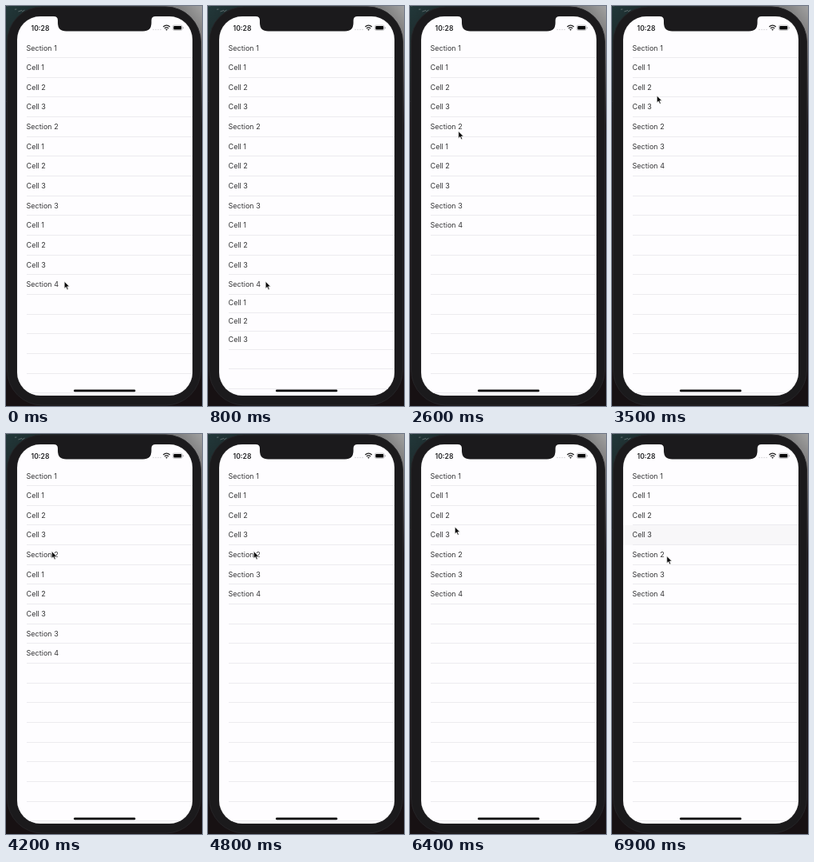
An HTML page that plays this animation: 246 px wide and 500 px high, repeating every 7 s.

```html
<!DOCTYPE html>
<html lang="en">
<head>
<meta charset="utf-8">
<title>Expandable list</title>
<style>
  html, body { margin: 0; width: 100%; height: 100%; overflow: hidden; background: #151214; }
  #stage { position: relative; width: 246px; height: 500px; overflow: hidden; }
  svg { position: absolute; left: 0; top: 0; }
  #screen {
    position: absolute; left: 14px; top: 13px; width: 219.5px; height: 474px;
    border-radius: 29px; background: #fefdff; overflow: hidden;
    box-shadow: 0 0 1px #fff6;
  }
  #list {
    --row: 24.67px;
    position: absolute; left: 0; right: 0; top: 27.5px;
    font: 400 9px Inter, "Liberation Sans", sans-serif; color: #343436;
  }
  .slot { position: relative; height: var(--row); overflow: hidden; }
  .row {
    position: absolute; left: 0; right: 0; bottom: 0; height: var(--row);
    line-height: var(--row); padding-left: 11.6px; white-space: pre;
  }
  .row::after {
    content: ""; position: absolute; left: 12px; right: 0; bottom: 0;
    height: 1px; background: #ecebef;
  }
  .clock { font: 600 8.6px Inter, "Liberation Sans", sans-serif; fill: #222224; }
</style>
</head>
<body>
<div id="stage">
  <svg width="246" height="500" viewBox="0 0 246 500">
    <defs>
      <linearGradient id="sky">
        <stop offset="0" stop-color="#22383a"/>
        <stop offset=".3" stop-color="#1a2324"/>
        <stop offset=".7" stop-color="#48494a"/>
        <stop offset="1" stop-color="#a2a2a2"/>
      </linearGradient>
      <linearGradient id="dusk" x2="0" y2="1">
        <stop offset="0" stop-color="#171113" stop-opacity="0"/>
        <stop offset=".3" stop-color="#171113"/>
      </linearGradient>
    </defs>
    <rect width="246" height="500" fill="url(#sky)"/>
    <path id="foam" fill="none" stroke="#8b9696" stroke-opacity=".6"/>
    <rect width="246" height="500" fill="url(#dusk)"/>
    <rect x="1.500" y="1" width="243" height="498" rx="44" fill="#1b1a1c" stroke="#252427"/>
  </svg>

  <div id="screen"><div id="list"></div></div>

  <svg width="246" height="500" viewBox="0 0 246 500">
    <path fill="#1b1a1c" d="M60 12V13Q65 13 65 18V21Q65 31.5 75.5 31.5H172Q182.500 31.5 182.500 21V18Q182.500 13 187.500 13V12Z"/>
    <text class="clock" x="31.500" y="30.500">10:28</text>
    <path d="M185 29.500H195" stroke="#cfcfd2" stroke-width="1.500" stroke-linecap="round" stroke-dasharray="0 3"/>
    <g fill="none" stroke="#222" stroke-width="1.300">
      <path d="M197.300 26Q201.500 22.200 205.700 26"/>
      <path d="M199 28Q201.500 25.700 204 28"/>
    </g>
    <path fill="#222" d="M201.500 30.800L200.100 29.300Q201.500 28.200 202.900 29.300Z"/>
    <rect x="209.300" y="24" width="12" height="6.400" rx="1.800" fill="none" stroke="#b0b0b3" stroke-width=".7"/>
    <rect x="210.300" y="25" width="10" height="4.400" rx="1" fill="#0a0a0a"/>
    <rect x="222" y="26.200" width="1" height="2" rx=".5" fill="#b0b0b3"/>
    <rect x="85" y="479.500" width="77.500" height="2.800" rx="1.400" fill="#050505"/>
    <path id="cursor" d="M0 0V9.400L2.200 7.400L3.700 10.900L5.300 10.200L3.800 6.800H6.800Z"
          fill="#0b0b0b" stroke="#fff" stroke-width=".7" stroke-linejoin="round"/>
  </svg>
</div>

<script>
const LOOP = 7000, STEP = 100, SLIDE = 300, ROW = 24.67;

// Per section: starts open?, then the times at which it toggles
const sections = [
  { open: 1, taps: [5450, 5850] },
  { open: 1, taps: [2750, 3850, 4450] },
  { open: 1, taps: [1750] },
  { open: 0, taps: [350, 750] }
];

// Pointer glides from rest to rest
const home = { x: 73.2, y: 344.3 };
const glides = [
  { at: 0, end: 100, x: 72.2, y: 344.3 },
  { at: 1100, end: 1400, x: 94, y: 225 },
  { at: 1400, end: 1600, x: 78.8, y: 243.8 },
  { at: 2100, end: 2600, x: 60.8, y: 156.5 },
  { at: 3100, end: 3500, x: 56.3, y: 112 },
  { at: 3500, end: 3800, x: 57.3, y: 146.6 },
  { at: 4800, end: 5300, x: 53.3, y: 53.2 },
  { at: 6000, end: 6400, x: 56.3, y: 116 },
  { at: 6600, end: 6900, x: 68.8, y: 152.6 }
];

const list = document.getElementById("list");
const cursor = document.getElementById("cursor");

const clamp = v => Math.min(1, Math.max(0, v));
const part = (t, from, to) => clamp((t - from) / (to - from));
const easeInOut = v => v * v * (3 - 2 * v);
const easeOut = v => v * (2 - v);

function addRow(text) {
  const slot = document.createElement("div");
  const row = document.createElement("div");
  slot.className = "slot";
  row.className = "row";
  row.textContent = text;
  slot.append(row);
  list.append(slot);
  return slot;
}

sections.forEach((s, i) => {
  s.head = addRow(`Section ${i + 1}`);
  s.cells = [1, 2, 3].map(n => addRow(`Cell ${n}`));
});
for (let i = 0; i < 16; i++) addRow("");

// Pale seeded streaks on the wallpaper's left corner
let seed = 7;
const random = () => (seed = seed * 16807 % 2147483647) / 2147483647;
let streaks = "";
for (let i = 0; i < 40; i++) {
  streaks += `M${random() * 22} ${random() * 130}l${2 + random() * 4} ${random() * 3 - 3}`;
}
document.getElementById("foam").setAttribute("d", streaks);

function openness({ open, taps }, t) {
  return taps.reduce((p, tap, i) => {
    const dir = (i + open) % 2 ? -1 : 1;
    return p + dir * easeInOut(part(t, tap, tap + SLIDE));
  }, open);
}

// Touch highlight: appears at once, then fades
function glow(slot, t, from, to) {
  const alpha = t < from ? 0 : 0.7 * (1 - part(t, from, to));
  slot.firstChild.style.background = `rgba(209, 209, 212, ${alpha})`;
}

function pointer(t) {
  return glides.reduce((p, g) => {
    const k = easeOut(part(t, g.at, g.end));
    return { x: p.x + (g.x - p.x) * k, y: p.y + (g.y - p.y) * k };
  }, home);
}

function draw(t) {
  for (const s of sections) {
    const h = ROW * openness(s, t);
    for (const c of s.cells) c.style.height = `${h}px`;
  }
  glow(sections[0].head, t, 5800, 6100);
  glow(sections[0].cells[2], t, 6500, 7000);
  const { x, y } = pointer(t);
  cursor.setAttribute("transform", `translate(${x} ${y}) scale(.95)`);
}

const start = performance.now();
function tick(now) {
  const t = Math.max(0, now - start) % LOOP;
  draw(Math.floor(t / STEP) * STEP);
  requestAnimationFrame(tick);
}
draw(0);
requestAnimationFrame(tick);
</script>
</body>
</html>
```
